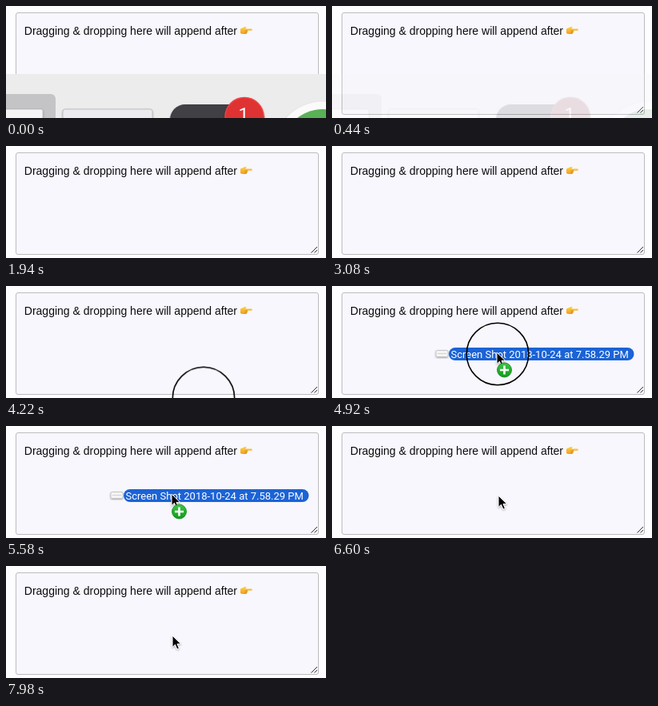
These frames come from a looping animation (400x140 px, 8000 ms). An HTML page:

```html
<!DOCTYPE html>
<html lang="en">
<head>
<meta charset="utf-8">
<title>Drag and drop</title>
<style>
  html, body { margin: 0; width: 100%; height: 100%; overflow: hidden; background: #fdfdff; }
  svg { display: block; width: 400px; height: 140px; }
  .field-text { font: 14px "Liberation Sans", Arial, sans-serif; fill: #0c0c0e; }
  .file-name { font: 13px Roboto, sans-serif; fill: #fff; }
  .badge-text { font: 23px Roboto, sans-serif; fill: #fff; text-anchor: middle; }

  .dock, .pointer, .ring, .arrow, .drag { animation: 8s linear infinite; }
  .dock { animation-name: dock; }
  .pointer { animation-name: move; }
  .ring { animation-name: ring; }
  .arrow { animation-name: arrow; }
  .drag { animation-name: drag; }

  @keyframes dock {
    0%, .5% { opacity: 1; filter: saturate(1); }
    5.5% { opacity: .15; filter: saturate(.5); }
    6.75%, 100% { opacity: 0; filter: saturate(.5); }
  }
  @keyframes move {
    0%, 52.2% { transform: translate(248px, 152px); }
    52.75% { transform: translate(247px, 140.3px); animation-timing-function: cubic-bezier(.25, .5, .45, 1); }
    61.5%, 62.75% { transform: translate(207px, 85px); }
    66%, 70% { transform: translate(208px, 87px); }
    71.5%, 100% { transform: translate(209px, 89px); }
  }
  @keyframes ring {
    0%, 52.24% { opacity: 0; }
    52.25%, 62.5% { opacity: 1; }
    64.5%, 100% { opacity: 0; }
  }
  @keyframes arrow {
    0%, 52.99% { opacity: 0; }
    53%, 100% { opacity: 1; }
  }
  @keyframes drag {
    0%, 53.49% { opacity: 0; }
    53.5%, 70.99% { opacity: 1; }
    71%, 100% { opacity: 0; }
  }
</style>
</head>
<body>
<svg viewBox="0 0 400 140">
  <defs>
    <linearGradient id="skin" x2="0" y2="1">
      <stop stop-color="#ffd23c"/>
      <stop offset="1" stop-color="#f0a024"/>
    </linearGradient>
    <linearGradient id="plus" x2="0" y2="1">
      <stop stop-color="#3fc544"/>
      <stop offset="1" stop-color="#109a1b"/>
    </linearGradient>
    <filter id="soft" x="-30%" y="-30%" width="160%" height="160%">
      <feDropShadow dx="0" dy="1" stdDeviation="1.2" flood-opacity=".35"/>
    </filter>
  </defs>

  <rect width="400" height="140" fill="#fdfdff"/>
  <rect x="12.5" y="8.5" width="378" height="127" rx="2.5" fill="#f7f7fd" stroke="#bcbcc0"/>
  <path d="M381.500 133.500l7.500-7.500M385.500 133.500l3.500-3.500" stroke="#333" fill="none"/>
  <text class="field-text" x="22.8" y="36">Dragging &amp; dropping here will append after</text>

  <g class="hand">
    <path d="M293 28.500q2-.5 3.800-1.800q1.600-1 3.300-.6q.8.7-.1 1.600l-.8.900h7.300q1.300.1 1.300 1.100t-1.300 1.100h-4.500q.8.800-.1 1.500q.3 1-.8 1.400q-.2 1.200-1.600 1.200h-3.500q-1.700 0-3-1z" fill="url(#skin)"/>
    <path d="M298.500 30.800h3.500M298.500 32.400h3M298.300 34h2.600" stroke="#cf7d1c" stroke-width=".6"/>
  </g>

  <g class="dock">
    <rect y="85" width="400" height="55" fill="#ececed"/>
    <rect x="-12" y="110" width="74" height="50" rx="6" fill="#c4c4c6"/>
    <g filter="url(#soft)">
      <rect x="-10" y="129" width="56" height="30" rx="2" fill="#f4f4f5" stroke="#b4b4b6" stroke-width=".7"/>
      <rect x="71" y="129" width="112" height="30" rx="3" fill="#ececf0" stroke="#b4b4b8" stroke-width=".8"/>
      <circle cx="396" cy="181" r="61.500" fill="#fbfbfb"/>
      <rect x="205" y="123" width="118" height="60" rx="19" fill="#403f45"/>
    </g>
    <circle cx="396" cy="181" r="52" fill="#5ab056"/>
    <g filter="url(#soft)"><circle cx="298" cy="138.500" r="24" fill="#df3333" stroke="#f24040" stroke-width="1.500"/></g>
    <text class="badge-text" x="297" y="144">1</text>
  </g>

  <g class="pointer">
    <g class="drag">
      <g filter="url(#soft)">
        <rect x="-77" y="-4.500" width="15" height="8" rx="1.500" fill="#f4f4f4" stroke="#b5b5b8" stroke-width=".7"/>
      </g>
      <path d="M-75-.5h11" stroke="#d4d4d6"/>
      <rect x="-61" y="-8" width="231.500" height="16" rx="8" fill="#1b63d6"/>
      <text class="file-name" x="-58.500" y="4.800">Screen Shot 2018-10-24 at 7.58.29 PM</text>
    </g>
    <circle class="ring" r="38.700" fill="none" stroke="#000" stroke-width="1.600"/>
    <path class="arrow" filter="url(#soft)" d="M-1-2v14.500l3.400-3.200l2.500 5.800l2.500-1.100l-2.400-5.600h4.700z" fill="#000" stroke="#fff" stroke-width="1" stroke-linejoin="round"/>
    <g class="drag">
      <circle cx="8.500" cy="20" r="9" fill="url(#plus)" stroke="#0d8417" stroke-width=".8"/>
      <path d="M8.500 14.500v11M3 20h11" stroke="#fff" stroke-width="2.600"/>
    </g>
  </g>
</svg>
</body>
</html>
```
